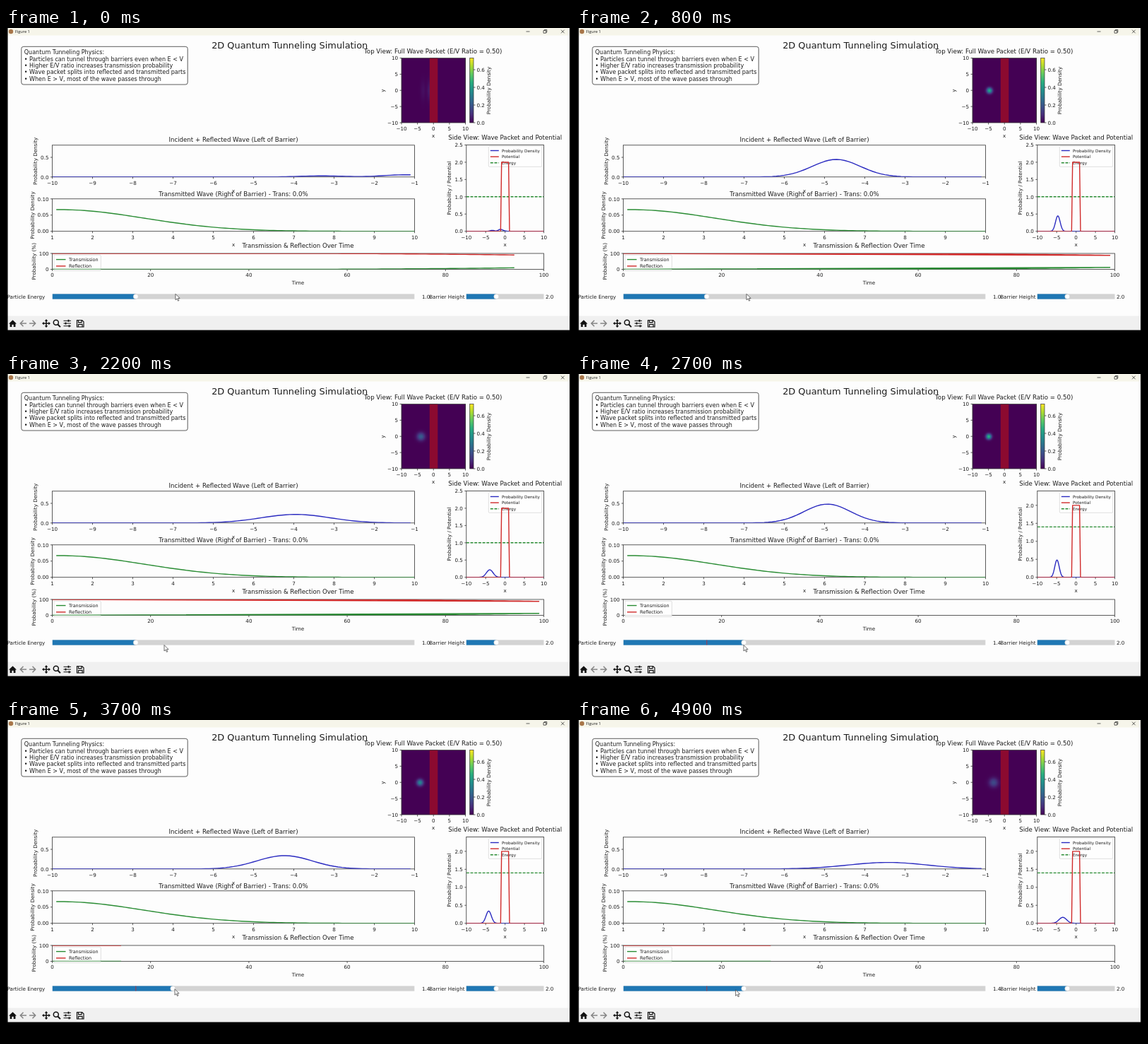
An HTML page with a canvas that plays this animation: 800 px wide and 450 px high, repeating every 5 s.

```html
<!DOCTYPE html>
<html lang="en">
<head>
<meta charset="utf-8">
<title>2D Quantum Tunneling Simulation</title>
<style>
  html, body { margin: 0; width: 100%; height: 100%; overflow: hidden; background: #000; }
  #stage { position: relative; width: 800px; height: 450px; overflow: hidden; background: #fdfdfd; }
  #heat { position: absolute; left: 560px; top: 42.5px; width: 90.5px; height: 91.5px; }
  svg { position: absolute; left: 0; top: 0; }
  text { font-family: "DejaVu Sans", Verdana, sans-serif; font-size: 7.17px; fill: #1c1c1c; white-space: pre; }
  .title { font-size: 8.62px; }
  .main { font-size: 12.9px; }
  .note { font-size: 8.02px; }
  .leg { font-size: 6.45px; }
  .leg8 { font-size: 5.73px; }
  .win { font-family: "Open Sans", sans-serif; font-size: 5.6px; }
  .spine { fill: none; stroke: #333; stroke-width: .8; }
  .curve { fill: none; stroke-width: 1.4; stroke-linejoin: round; }
  .blue { stroke: #2b2bc0; }
  .red { stroke: #d02a2a; }
  .green { stroke: #2a8c34; }
  .dash { stroke-dasharray: 4 1.7; }
  .box { fill: #fff; fill-opacity: .8; stroke: #ccc; stroke-width: .6; }
  .icon { fill: none; stroke: #111; stroke-width: 1.5; }
</style>
</head>
<body>
<div id="stage">
  <canvas id="heat" width="91" height="92"></canvas>
  <svg id="fig" width="800" height="450" viewBox="0 0 800 450"></svg>
</div>
<script>
const $ = id => document.getElementById(id);
const VIRIDIS = ['440154', '472d7b', '3b528b', '2c728e', '21918c', '28ae80', '5ec962', 'addc30', 'fde725'];
const rgb = VIRIDIS.map(h => [0, 2, 4].map(i => parseInt(h.substr(i, 2), 16)));

// Axes: pixel box and data limits
const axes = (x0, y0, x1, y1, a, b, lo, hi) => ({
  x0, y0, x1, y1,
  X: v => x0 + (v - a) / (b - a) * (x1 - x0),
  Y: v => y1 - (v - lo) / (hi - lo) * (y1 - y0)
});
const left = axes(65.5, 165.8, 578.5, 210.8, -10, -1, 0, .81);
const right = axes(65.5, 241.8, 578.5, 287.7, 1, 10, 0, .1);
const rates = axes(65.5, 319, 761.5, 341.5, 0, 100, 0, 100);
const top2d = axes(560, 42.5, 650.5, 134, -10, 10, -10, 10);
const bar = axes(656.7, 42.5, 662, 134, 0, 1, 0, .732);
const sideAt = max => axes(651.8, 165.5, 761.5, 287.7, -10, 10, 0, max);
const sides = [sideAt(2.5), sideAt(2.4)];

let out = '';
const add = s => { out += s; };
const num = (v, d = 0) => (v < 0 ? '\u2212' : '') + Math.abs(v).toFixed(d);
const esc = s => s.replace(/&/g, '&amp;').replace(/</g, '&lt;');
const label = (x, y, s, anchor = 'middle', cls = '', extra = '') =>
  `<text x="${x}" y="${y}" text-anchor="${anchor}" class="${cls}" ${extra}>${esc(s)}</text>`;
const text = (...a) => add(label(...a));
const vtext = (x, y, s) => text(x, y, s, 'middle', '', `transform="rotate(-90 ${x} ${y})"`);
const rect = (x, y, w, h, attrs) => add(`<rect x="${x}" y="${y}" width="${w}" height="${h}" ${attrs}/>`);
const path = (d, attrs) => add(`<path d="${d}" ${attrs}/>`);
const frame = a => rect(a.x0, a.y0, a.x1 - a.x0, a.y1 - a.y0, 'class="spine"');
const range = (a, b, step) => Array.from({ length: Math.round((b - a) / step) + 1 }, (_, i) => a + i * step);
const xTicks = (a, vals) => vals.forEach(v => {
  path(`M${a.X(v)} ${a.y1}v2.5`, 'class="spine"');
  text(a.X(v), a.y1 + 10.9, num(v));
});
const yTicks = (a, vals, d) => vals.map(v =>
  `<path d="M${a.x0} ${a.Y(v)}h-2.5" class="spine"/>` + label(a.x0 - 5, a.Y(v) + 2.7, num(v, d), 'end')).join('');
const clip = (id, a) => add(`<clipPath id="${id}"><rect x="${a.x0}" y="${a.y0}" width="${a.x1 - a.x0}" height="${a.y1 - a.y0}"/></clipPath>`);
const curve = (id, cls, area) => add(`<g clip-path="url(#${area})"><path id="${id}" class="curve ${cls}"/></g>`);
const line = (a, xs, f) => 'M' + xs.map(x => a.X(x).toFixed(2) + ' ' + a.Y(f(x)).toFixed(2)).join('L');

function windowFrame() {
  rect(0, 0, 800, 10.5, 'fill="#f6f5ea"');
  add('<circle cx="7" cy="5" r="3.2" fill="#a8764a"/>');
  text(13, 7.2, 'Figure 1', 'start', 'win');
  path('M736.5 5h5M761 3.6h3.6v3.6h-3.6zM762.3 3.6v-1.1h3.5v3.6h-1.2M786 2.7l4.6 4.6M790.6 2.7l-4.6 4.6',
    'fill="none" stroke="#222" stroke-width=".7"');
  rect(0, 407.5, 800, 21, 'fill="#f0f0f0"');
  path('M4 418.5l5.5-5.3 5.5 5.3h-1.6v4.6h-2.7v-3.3h-2.4v3.3h-2.7v-4.6z', 'fill="#111"');
  path('M29 418h-8.5M24.5 413.8l-4.2 4.2 4.2 4.2M33 418h8.5M37.5 413.8l4.2 4.2-4.2 4.2',
    'class="icon" style="stroke:#858585"');
  path('M52.5 418h9M57 413.5v9', 'class="icon"');
  path('M57 412l2.3 2.7h-4.6zM57 424l2.3-2.7h-4.6zM51 418l2.7-2.3v4.6zM63 418l-2.7-2.3v4.6z', 'fill="#111"');
  add('<circle cx="70.8" cy="416.8" r="3.5" class="icon"/>');
  path('M73.4 419.5l3.5 3.6', 'class="icon" style="stroke-width:2"');
  path('M81.5 414.3h10.5M81.5 418h10.5M81.5 421.7h10.5', 'class="icon" style="stroke-width:1"');
  path('M88.5 412.8v3M84.5 416.5v3M89.5 420.2v3', 'class="icon" style="stroke-width:1.8"');
  path('M100.5 413.5h7.2l2.3 2.3v7.2h-9.5zM102.5 413.5v3.2h4.5v-3.2M102.5 423v-3.7h5.5v3.7',
    'class="icon" style="stroke-width:1.2"');
}

function plots() {
  text(401.7, 28.7, '2D Quantum Tunneling Simulation', 'middle', 'main');
  rect(21.8, 26.3, 235.4, 53.7, 'rx="3" fill="#fff" stroke="#333" stroke-width=".8"');
  ['Quantum Tunneling Physics:', '• Particles can tunnel through barriers even when E < V',
    '• Higher E/V ratio increases transmission probability',
    '• Wave packet splits into reflected and transmitted parts',
    '• When E > V, most of the wave passes through'
  ].forEach((s, i) => text(25.8, 37.2 + 9.35 * i, s, 'start', 'note'));

  frame(left);
  xTicks(left, range(-10, -1, 1));
  add(yTicks(left, [0, .5], 1));
  text(322, 160.6, 'Incident + Reflected Wave (Left of Barrier)', 'middle', 'title');
  text(322, 233.3, 'x');
  vtext(44, 188.3, 'Probability Density');

  frame(right);
  xTicks(right, range(1, 10, 1));
  add(yTicks(right, [0, .05, .1], 2));
  text(322, 237.5, 'Transmitted Wave (Right of Barrier) - Trans: 0.0%', 'middle', 'title');
  text(322, 309.3, 'x');
  vtext(40, 265, 'Probability Density');

  frame(rates);
  xTicks(rates, range(0, 100, 20));
  add(yTicks(rates, [0, 100], 0));
  text(413.5, 311.2, 'Transmission & Reflection Over Time', 'middle', 'title');
  text(413.5, 362.6, 'Time');
  vtext(42, 330.3, 'Probability (%)');
  rect(67.8, 321.3, 66.5, 22.2, 'rx="1.2" class="box"');
  [['Transmission', 'green'], ['Reflection', 'red']].forEach(([s, c], i) => {
    path(`M71 ${327.6 + 9.3 * i}h13.5`, `class="curve ${c}"`);
    text(89, 330 + 9.3 * i, s, 'start', 'leg');
  });

  rect(599.8, 42.5, 11.5, 91.5, 'fill="#8c0a30"');
  frame(top2d);
  xTicks(top2d, range(-10, 10, 5));
  add(yTicks(top2d, range(-10, 10, 5), 0));
  text(604.7, 36, 'Top View: Full Wave Packet (E/V Ratio = 0.50)', 'middle', 'title');
  text(605, 155.3, 'x');
  vtext(535.5, 88.5, 'y');
  add('<linearGradient id="scale" x1="0" x2="0" y1="1" y2="0">' +
    VIRIDIS.map((c, i) => `<stop offset="${i / 8}" stop-color="#${c}"/>`).join('') + '</linearGradient>');
  rect(bar.x0, bar.y0, bar.x1 - bar.x0, bar.y1 - bar.y0, 'fill="url(#scale)" stroke="#333" stroke-width=".7"');
  range(0, .6, .2).forEach(v => {
    path(`M${bar.x1} ${bar.Y(v)}h2.5`, 'class="spine"');
    text(666.5, bar.Y(v) + 2.7, num(v, 1), 'start');
  });
  vtext(685.8, 88.5, 'Probability Density');

  const s = sides[0];
  frame(s);
  xTicks(s, range(-10, 10, 5));
  add(`<g id="ticks0">${yTicks(sides[0], range(0, 2.5, .5), 1)}</g>`);
  add(`<g id="ticks1">${yTicks(sides[1], range(0, 2, .5), 1)}</g>`);
  text(706.7, 157.9, 'Side View: Wave Packet and Potential', 'middle', 'title');
  text(706.7, 309.3, 'x');
  vtext(630.5, 226.6, 'Probability / Potential');
  rect(683.3, 167.3, 75.5, 29, 'rx="1.2" class="box"');
  [['Probability Density', 'blue'], ['Potential', 'red'], ['Energy', 'green dash']].forEach(([n, c], i) => {
    path(`M685.8 ${173.5 + 8.65 * i}h12`, `class="curve ${c}"`);
    text(702, 175.6 + 8.65 * i, n, 'start', 'leg8');
  });
}

function sliders() {
  text(55.3, 382.5, 'Particle Energy', 'end');
  text(649.5, 382.5, 'Barrier Height', 'end');
  const track = (x, w, attrs) => rect(x, 376.4, w, 7.2, attrs);
  track(65.8, 512.5, 'fill="#d3d3d3"');
  track(651.8, 109.7, 'fill="#d3d3d3"');
  track(65.8, 118, 'id="fill" fill="#1f77b4"');
  track(651.8, 42.5, 'fill="#1f77b4"');
  path('M183.8 376.5v7', 'stroke="#d02a2a" stroke-width=".8"');
  const knob = 'cy="380" r="3.5" fill="#fff" stroke="#c9c9c9" stroke-width=".6"';
  add(`<circle id="knob" cx="183.8" ${knob}/><circle cx="694.3" ${knob}/>`);
  text(589, 382.5, '1.0', 'start', '', 'id="energy"');
  text(764, 382.5, '2.0', 'start');
}

function build() {
  [['cl', left], ['cr', right], ['ct', rates], ['cs', sides[0]]].forEach(c => clip(...c));
  windowFrame();
  plots();
  curve('wave', 'blue', 'cl');
  curve('trans', 'green', 'cr');
  curve('tLine', 'green', 'ct');
  curve('rLine', 'red', 'ct');
  curve('level', 'green dash', 'cs');
  curve('density', 'blue', 'cs');
  curve('potential', 'red', 'cs');
  sliders();
  path('M0 0v8.5l2-1.8 1.5 3.2 1.4-.6-1.5-3.1h2.7z', 'id="cursor" fill="#fff" stroke="#333" stroke-width=".7"');
  path('M0 0h2.5v428H0zM798 0h2v428h-2zM0 427.4h800V450H0z', 'fill="#000"');
  $('fig').innerHTML = out;
  $('trans').setAttribute('d', line(right, range(1.1, 10, .1), x => .0668 * Math.exp(-((x - 1.2) ** 2) / 8.7)));
}

// Simulation step shown at each 100 ms tick
function stepAt(k) {
  if (k < 4) return 94 + Math.floor(1.5 * k);
  if (k <= 15) return Math.round(1.62 * (k - 4));
  if (k < 27) return 18 + Math.round((k - 15) * 6 / 7);
  return Math.floor(1.4 * (k - 27) + 1e-6);
}

// Density along y = 0, and its variance across y
function packet(n, high) {
  if (n >= 90) {
    const d = (n - 94) * .015, bump = (x, c) => Math.exp(-(((x - c) / .75) ** 2));
    return {
      f: x => .028 * bump(x, -3.3 - d) + .055 * (x > -1.25 ? Math.exp(-((x + 1.25) ** 2) / 1.1) : bump(x, -1.25)),
      v: 5
    };
  }
  const spread = 1 + .0021 * n * n, v = .332 * spread;
  const c = high ? -4.93 + .05 * n : -4.96 + .042 * n;
  return { f: x => .48 / spread * Math.exp(-((x - c) ** 2) / (2 * v)), v };
}

const heat = $('heat').getContext('2d');
const image = heat.createImageData(91, 92);
function drawHeat({ f, v }) {
  for (let i = 0; i < 91; i++) {
    const base = f(-10 + (i + .5) * 20 / 91);
    for (let j = 0; j < 92; j++) {
      const y = 10 - (j + .5) * 20 / 92;
      const s = Math.min(7.999, base * Math.exp(-y * y / (2 * v)) / .732 * 8);
      const c = Math.floor(s), p = (j * 91 + i) * 4;
      for (let q = 0; q < 3; q++) image.data[p + q] = rgb[c][q] + (rgb[c + 1][q] - rgb[c][q]) * (s - c);
      image.data[p + 3] = 255;
    }
  }
  heat.putImageData(image, 0, 0);
}

const POINTER = [[0, 240, 376.3], [9, 240, 376.3], [14, 190, 379], [17, 188, 379.5], [22, 224, 383.5],
  [27, 236, 383.5], [31, 237, 383.5], [37, 239, 380.7], [43, 239, 380.7], [49, 224.6, 381.8]];
function pointerAt(k) {
  const i = Math.max(1, POINTER.findIndex(p => p[0] >= k));
  const [a, b] = [POINTER[i - 1], POINTER[i]], u = (k - a[0]) / (b[0] - a[0]);
  return [1, 2].map(q => a[q] + (b[q] - a[q]) * u);
}

const leak = n => n < 45 ? 0 : 12 * ((n - 45) / 54) ** 2;
const set = (id, name, v) => $(id).setAttribute(name, v);

function draw(k) {
  const n = stepAt(k), high = k >= 27, side = sides[+high], p = packet(n, high);
  const energy = high ? 1.4 : 1, knob = high ? 236.3 : 183.8;

  drawHeat(p);
  set('wave', 'd', line(left, range(-10, -1.1, .1), p.f));
  set('density', 'd', line(side, range(-10, 10, .1), p.f));
  set('potential', 'd', line(side, [-10, -1.15, -.9, .9, 1.15, 10], x => Math.abs(x) < 1 ? 2 : 0));
  set('level', 'd', line(side, [-10, 10], () => energy));

  // After a full run the rate lines wrap back to time zero
  const again = !high && k >= 4;
  const steps = range(0, again ? 99 : n, 1);
  if (again) steps.push(0, n);
  set('tLine', 'd', line(rates, steps, leak));
  set('rLine', 'd', line(rates, steps, x => 100 - leak(x)));

  set('ticks0', 'display', high ? 'none' : 'inline');
  set('ticks1', 'display', high ? 'inline' : 'none');
  set('fill', 'width', knob - 65.8);
  set('knob', 'cx', knob);
  $('energy').textContent = energy.toFixed(1);
  set('cursor', 'transform', `translate(${pointerAt(k)})`);
}

build();
let shown = 0;
draw(0);
const start = performance.now();
function tick() {
  const k = Math.floor((performance.now() - start + 15) / 100) % 50;
  if (k !== shown) draw(shown = k);
  requestAnimationFrame(tick);
}
requestAnimationFrame(tick);
</script>
</body>
</html>
```
